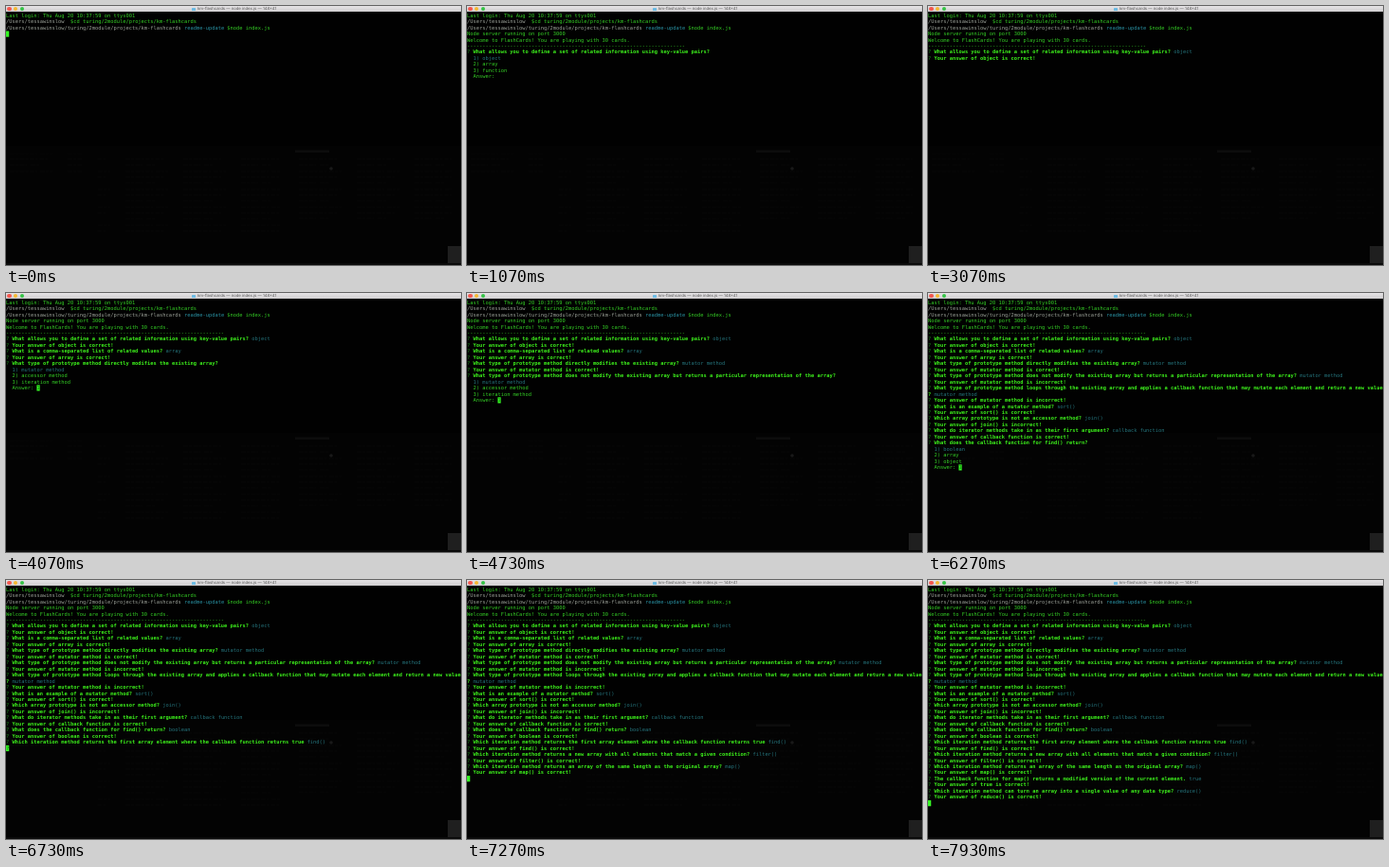
These frames come from a looping animation (480 px wide and 274 px high, 8 s). An HTML page:

```html
<!DOCTYPE html>
<html lang="en">
<head>
<meta charset="utf-8">
<title>Flashcards terminal</title>
<style>
html, body { margin: 0; width: 100%; height: 100%; overflow: hidden; background: #000; }
#stage { position: absolute; left: 0; top: 0; width: 480px; height: 274px; overflow: hidden; background: #010101; }
#back { position: absolute; left: 0; top: 0; }
#bar {
  position: absolute; left: 0; top: 0; width: 480px; height: 6px;
  background: linear-gradient(#e6e4e6, #cfcdcf);
}
#bar i { position: absolute; top: .8px; width: 4.4px; height: 4.4px; border-radius: 50%; }
#bar b { position: absolute; left: 196px; top: 1.5px; width: 4px; height: 3px; background: #6cbbe4; border-radius: .5px; }
#title {
  position: absolute; left: 201.5px; top: 0; white-space: pre; color: #5a5a5a;
  font: 17px/24px Inter, sans-serif; transform: scale(.25); transform-origin: 0 0;
  text-rendering: geometricPrecision;
}
/* 148 columns of 13px, scaled down to the stage width */
#term {
  position: absolute; left: .4px; top: 6.8px; margin: 0; width: 1950px; white-space: pre;
  font: 21.594px/25.88px "DejaVu Sans Mono", monospace; color: #35cf26;
  transform: scale(.24948); transform-origin: 0 0; text-rendering: geometricPrecision;
}
#term b { color: #3df01c; }
.path { color: #9da39a; }
.branch { color: #2a93a4; }
.cyan { color: #25747c; }
.mark { color: #1c8a1c; }
.cursor { background: #35f524; color: #0b7a08; }
</style>
</head>
<body>
<div id="stage">
  <svg id="back" width="480" height="274">
    <defs>
      <pattern id="lines" width="61" height="19" patternUnits="userSpaceOnUse">
        <path d="M4 4h29m3 0h13M4 10h41M4 16h18m4 0h9" stroke="#fff" stroke-width="1.2" stroke-dasharray="5 1 3 1.4"/>
      </pattern>
    </defs>
    <g fill="#fff">
      <path d="M0 148H480V274H0z" opacity=".006"/>
      <path d="M305 152.5h36v2.6h-36z" opacity=".04"/>
      <circle cx="343" cy="172" r="1.8" opacity=".09"/>
      <path d="M466 254h14v18h-14z" opacity=".11"/>
      <path d="M0 272h480v2H0z" opacity=".03"/>
    </g>
    <g fill="url(#lines)" opacity=".014">
      <path d="M0 156H80V180H0zM96 160H290V240H96zM306 160H470V225H306z"/>
    </g>
  </svg>
  <pre id="term"></pre>
  <div id="bar">
    <i style="left:1.2px;background:#f4574f"></i>
    <i style="left:8px;background:#f5b82e"></i>
    <i style="left:14.8px;background:#35c446"></i>
    <b></b>
    <div id="title">km-flashcards — node index.js — 148×41</div>
  </div>
</div>
<script>
const LOOP = 8000;
const METHODS = 'mutator method,accessor method,iteration method';
const ITERATORS = 'find(),filter(),map()';

// [asked, answered, graded, question, choices, picked choice, wrong]
const cards = [
  [200, 2530, 3070, 'What allows you to define a set of related information using key-value pairs?', 'object,array,function', 0],
  [3200, 3530, 3600, 'What is a comma-separated list of related values?', 'object,array,function', 1],
  [4070, 4530, 4670, 'What type of prototype method directly modifies the existing array?', METHODS, 0],
  [4730, 4870, 4930, 'What type of prototype method does not modify the existing array but returns a particular representation of the array?', METHODS, 0, true],
  [5000, 5130, 5200, 'What type of prototype method loops through the existing array and applies a callback function that may mutate each element and return a new value\n?', METHODS, 0, true],
  [5270, 5530, 5600, 'What is an example of a mutator method?', 'sort(),map(),join()', 0],
  [5670, 5870, 5930, 'Which array prototype is not an accessor method?', 'join(),slice(),splice()', 0, true],
  [6000, 6130, 6200, 'What do iterator methods take in as their first argument?', 'callback function,current element,an array', 0],
  [6270, 6470, 6530, 'What does the callback function for find() return?', 'boolean,array,object', 0],
  [6600, 6730, 6800, 'Which iteration method returns the first array element where the callback function returns true', ITERATORS, 0],
  [6870, 7000, 7070, 'Which iteration method returns a new array with all elements that match a given condition?', ITERATORS, 1],
  [7130, 7200, 7270, 'Which iteration method returns an array of the same length as the original array?', ITERATORS, 2],
  [7330, 7530, 7670, 'The callback function for map() returns a modified version of the current element.', 'true,false', 0],
  [7730, 7870, 7930, 'Which iteration method can turn an array into a single value of any data type?', 'reduce(),map(),filter()', 0]
];
const cursorOff = [[1070, 1600], [2070, 2530], [3070, 3200], [4200, 4330]];

const span = (cls, text) => `<span class="${cls}">${text}</span>`;
const prompt = text => span('mark', '? ') + `<b>${text}</b>`;

const login = [
  'Last login: Thu Aug 20 10:37:59 on ttys001',
  span('path', '/Users/tessawinslow') + '  $cd turing/2module/projects/km-flashcards',
  span('path', '/Users/tessawinslow/turing/2module/projects/km-flashcards') + ' ' +
    span('branch', 'readme-update') + ' $node index.js'
];
const welcome = [
  'Node server running on port 3000',
  'Welcome to FlashCards! You are playing with 30 cards.',
  '-'.repeat(71)
];

function screen(t) {
  const shown = !cursorOff.some(([a, b]) => t >= a && t < b);
  const cursor = (glyph = ' ') => shown ? span('cursor', glyph) : '';
  const rows = [...login];
  if (t >= 130) rows.push(...welcome);
  let tail = cursor();
  cards.forEach(([asked, answered, graded, question, list, pick, wrong], n) => {
    if (t < asked) return;
    const choices = list.split(',');
    if (t < answered) {
      rows.push(prompt(question));
      choices.forEach((c, i) => {
        const item = `  ${i + 1}) ${c}`;
        rows.push(i === pick ? span('cyan', item) : item);
      });
      tail = '  Answer: ' + cursor(n > 1 ? pick + 1 : ' ');
      return;
    }
    rows.push(prompt(question) + ' ' + span('cyan', choices[pick]));
    tail = cursor('?');
    if (t >= graded) {
      rows.push(prompt(`Your answer of ${choices[pick]} is ${wrong ? 'incorrect' : 'correct'}!`));
      tail = cursor();
    }
  });
  return [...rows, tail].join('\n');
}

const term = document.getElementById('term');
const start = performance.now();
let last = '';

function draw() {
  const html = screen((performance.now() - start) % LOOP);
  if (html !== last) term.innerHTML = last = html;
  requestAnimationFrame(draw);
}
draw();
</script>
</body>
</html>
```
